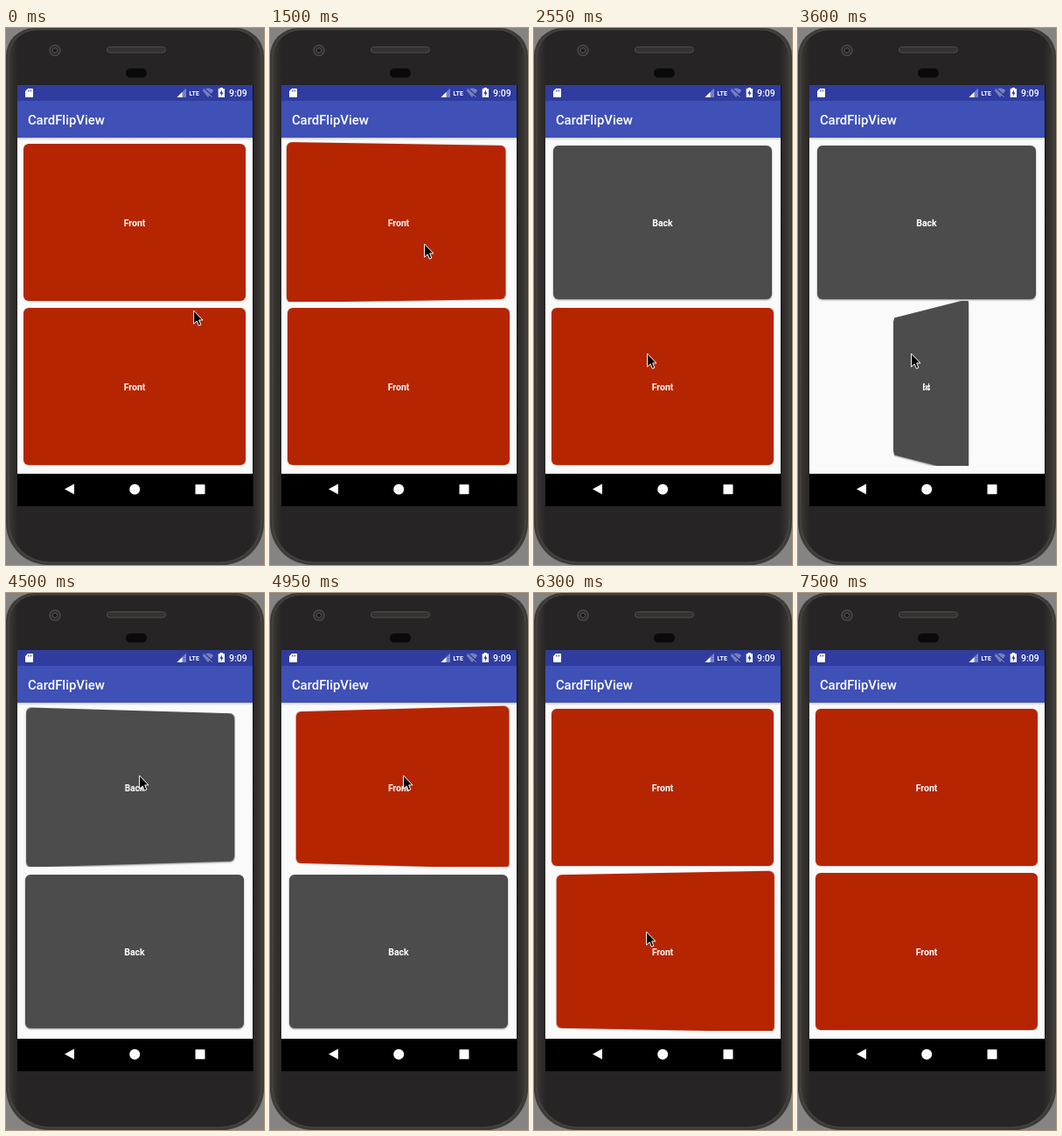
An HTML page that plays this animation: 295x612 px, repeating every 8100 ms.

```html
<!DOCTYPE html>
<html lang="en">
<head>
<meta charset="utf-8">
<title>Card flip</title>
<style>
  html, body { margin: 0; width: 100%; height: 100%; overflow: hidden; background: #858482; }
  #stage { position: relative; width: 295px; height: 612px; overflow: hidden; font-family: Roboto, sans-serif; }
  #stage > * { position: absolute; }
  svg { left: 0; top: 0; display: block; }
  .view { left: 13px; width: 269px; height: 188px; overflow: hidden; }
  .card {
    position: absolute; box-sizing: border-box; padding-top: 2px;
    display: flex; align-items: center; justify-content: center;
    border-radius: 6px; color: #fff; font-size: 10.5px; font-weight: 700;
  }
  .front { left: 7px; top: 8px; width: 254px; height: 179px; background: #b62502; box-shadow: 0 .5px 1.5px rgba(0,0,0,.3); }
  .back { left: 9px; top: 10px; width: 250px; height: 175px; background: #4c4c4c; box-shadow: 0 1px 2px rgba(0,0,0,.45); }
  .shade { left: 13px; top: 125px; width: 269px; height: 3px; background: linear-gradient(rgba(0,0,0,.18), rgba(0,0,0,0)); }
</style>
</head>
<body>
<div id="stage">
  <svg width="295" height="612" viewBox="0 0 295 612">
    <defs>
      <linearGradient id="body" x1="0" x2="1" y1="0" y2="0">
        <stop offset="0" stop-color="#3a3734"/>
        <stop offset=".04" stop-color="#262424"/>
        <stop offset=".96" stop-color="#262424"/>
        <stop offset="1" stop-color="#3a3734"/>
      </linearGradient>
    </defs>
    <!-- phone -->
    <path d="M0 32A32 32 0 0 1 32 0H263A32 32 0 0 1 295 32V564A48 48 0 0 1 247 612H48A48 48 0 0 1 0 564Z" fill="#3d3b38"/>
    <path d="M3 34A32 32 0 0 1 35 2H260A32 32 0 0 1 292 34V562A47 47 0 0 1 245 609H50A47 47 0 0 1 3 562Z" fill="url(#body)" stroke="#4d4a46"/>
    <circle cx="56" cy="25.5" r="6" fill="#2b2a2a" stroke="#4b4947" stroke-width="1.5"/>
    <circle cx="56" cy="25.5" r="2.8" fill="#1b1b1c" stroke="#5c5a59"/>
    <rect x="115.5" y="21.5" width="67" height="6.5" rx="3.2" fill="#353331" stroke="#514f4c"/>
    <rect x="137" y="46" width="24" height="10.5" rx="5.2" fill="#0a0a0a"/>
    <!-- screen -->
    <rect x="13" y="65" width="269" height="480" fill="#fafafa"/>
    <rect x="13" y="65" width="269" height="18" fill="#303c9f"/>
    <rect x="13" y="83" width="269" height="42" fill="#3f50b7"/>
    <rect x="13" y="508" width="269" height="37" fill="#000"/>
    <path d="M282.5 65V545" stroke="#131212"/>
    <!-- status icons -->
    <g fill="#fff">
      <path d="M25 69H30Q31 69 31 70V78Q31 79 30 79H23Q22 79 22 78V72Z"/>
      <path d="M25.5 70.5V72.5M27.3 70.5V72.5M29.1 70.5V72.5" stroke="#303c9f" stroke-width=".8"/>
      <path d="M206 68.5V79H195.5Z" opacity=".35"/>
      <path d="M201.5 73V79H195.5Z"/>
      <text x="209.5" y="77" font-size="7" font-weight="700">LTE</text>
      <path d="M224.5 71Q231 66 237.5 71L231 79Z" opacity=".35"/>
      <path d="M226 68.5L236.5 78.5" stroke="#303c9f" stroke-width="2"/>
      <path d="M225.5 69L236 79" stroke="#fff" opacity=".4"/>
      <path d="M244.7 69.2V68H248V69.2H250V79H242.7V69.2Z"/>
      <path d="M247 70.5L244.3 74.7H245.9V77.7L248.5 73.5H247Z" fill="#303c9f"/>
      <text x="255" y="78" font-size="10.5" font-weight="500">9:09</text>
      <text x="24.9" y="109.7" font-size="14.9" font-weight="500">CardFlipView</text>
      <path d="M67 525.5L78 519.5V531.5Z"/>
      <circle cx="147.2" cy="525.7" r="6"/>
      <rect x="216.5" y="520.3" width="11" height="11" rx=".5"/>
    </g>
  </svg>

  <div class="view" style="top:124px"><div class="card front">Front</div><div class="card back">Back</div></div>
  <div class="view" style="top:311px"><div class="card front">Front</div><div class="card back">Back</div></div>
  <div class="shade"></div>

  <svg id="cursor" width="13" height="20" viewBox="0 0 13 20">
    <path d="M.6 1V16.2L4.2 12.9L6.4 18.2L8.9 17.1L6.7 11.9H11Z" fill="#000" stroke="#fff" stroke-linejoin="round"/>
  </svg>
</div>
<script>
  const LOOP = 8100, TICK = 150, FLIP = 750, CAMERA = 958;
  const views = [...document.querySelectorAll('.view')];
  const cursor = document.getElementById('cursor');

  // start times of the flips of each view
  const flips = [[1389, 4347], [3172, 5671]];

  // pointer stops: time, x, y
  const stops = [
    [0, 214, 321], [150, 186, 268], [300, 176, 245],
    [2400, 131, 363], [2550, 129, 370], [4050, 152, 207],
    [5250, 128, 385], [6900, 184, 500], [7050, 234, 601], [7500, 234, 640]
  ];

  const ease = x => (1 - Math.cos(Math.PI * Math.min(1, Math.max(0, x)))) / 2;

  function turn(view, starts, t) {
    let half = 0, angle = 0;
    for (const s of starts) {
      const p = ease((t - s) / FLIP);
      if (p >= .5) half++;
      if (p > 0 && p < 1) angle = 180 * (p < .5 ? p : p - 1);
    }
    [...view.children].forEach((card, i) => {
      card.style.visibility = half % 2 === i ? 'visible' : 'hidden';
      card.style.transform = angle ? `perspective(${CAMERA}px) rotateY(${angle}deg)` : 'none';
    });
  }

  function draw(now) {
    const t = Math.floor(now % LOOP / TICK) * TICK;
    views.forEach((v, i) => turn(v, flips[i], t));
    const [, x, y] = stops.filter(s => s[0] <= t).pop();
    cursor.style.transform = `translate(${x}px, ${y}px)`;
  }

  let start;
  function loop(now) {
    start ??= now;
    draw(now - start);
    requestAnimationFrame(loop);
  }
  draw(0);
  requestAnimationFrame(loop);
</script>
</body>
</html>
```
